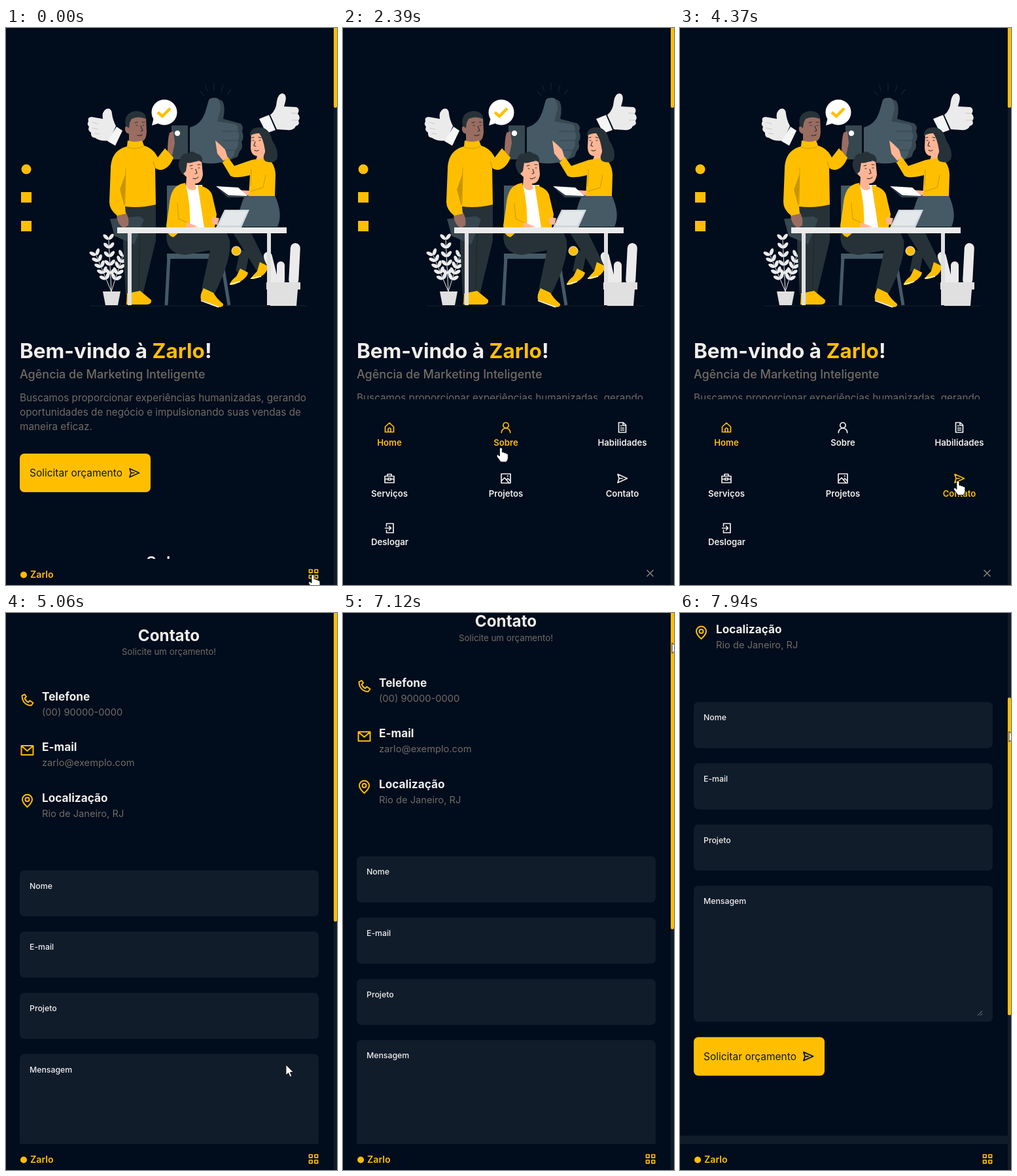
Animation of 506x852 px, one loop 8000 ms. Source, as an HTML page:

```html
<!DOCTYPE html>
<html lang="pt-BR">
<head>
<meta charset="utf-8">
<title>Agência de marketing</title>
<style>
  html, body { margin: 0; width: 100%; height: 100%; overflow: hidden; background: #010c1c; }
  svg { display: block; width: 100%; height: 100%; }
  text { font-family: Inter, "Open Sans", sans-serif; white-space: pre; }
  .y { fill: #ffbf00; }
  .dark { fill: #263238; }
  .slate { fill: #455a64; }
  .deep { fill: #37474f; }
  .pale { fill: #ebebeb; }
  .grey { fill: #e0e0e0; }
  .brown { fill: #9a6d61; }
  .skin { fill: #ffb594; }
  .fold { fill: none; stroke: #d49f00; stroke-width: 1.2; }
  .face { fill: none; stroke: #263238; stroke-width: 1.1; stroke-linecap: round; }
  .icon { fill: none; stroke: currentColor; stroke-width: 1.7; stroke-linecap: round; stroke-linejoin: round; }
  #contact .icon { stroke-width: 2; }
</style>
</head>
<body>
<svg viewBox="0 0 506 852" preserveAspectRatio="none">
  <defs>
    <path id="send" d="M-7-6.500 7.500 0-7 6.500-5 0zM-5 0H0"/>
    <path id="home-icon" d="M-6.500-1 0-7 6.500-1V7H-6.500zM-2 7V2Q0-.5 2 2V7"/>
    <path id="user" d="M0-7.500a4.200 4.200 0 1 1 0 8.400 4.200 4.200 0 1 1 0-8.400M-6.700 8C-6.700-1 6.700-1 6.700 8"/>
    <path id="doc" d="M-5.500-7.500H1.500L5.500-3.500V7.500H-5.500zM1-7V-3H5M-2.500-2.500H-1M-2.500 1H2.500M-2.500 4H2.500"/>
    <path id="case" d="M-7-3.500H7V6.500H-7zM-3-3.500V-6.500H3V-3.500M-7 1H-2M2 1H7M-2-.5H2V2.500H-2z"/>
    <path id="photo" d="M-7-7H7V7H-7zM-7 4-2-1 5 7M1 2 3 0 7 4M2.500-4h.5v.5h-.5z"/>
    <path id="exit" d="M-5-3V-7H5.500V7H-5V3M-7 0H2M-1-3 2 0-1 3"/>
    <path id="phone" d="M-4-8-8-6C-8 3-2 9 6 9L9 5 4 1.500 1.500 4C-1 3-3 0-4-2L-1.500-4.500z"/>
    <path id="mail" d="M-9-7H9V7H-9zM-8-6 0 1 8-6"/>
    <path id="pin" d="M0 9.500C-5 5-7.500 2-7.500-2a7.500 7.500 0 0 1 15 0C7.500 2 5 5 0 9.500zM0-5a3 3 0 1 1 0 6 3 3 0 1 1 0-6"/>
    <path id="grid" d="M-6.500-6.500h4.600v4.600h-4.600zM2-6.500h4.600v4.600H2zM-6.500 2h4.600v4.600h-4.600zM2 2h4.600v4.600H2z"/>
  </defs>
  <rect width="506" height="852" fill="#010c1c"/>

  <g id="home">
    <path d="M128 425H460" stroke="#17222c"/>
    <path d="M318 84V96M332 87 329 98M344 94 338 102M304 87 308 97M297 97 303 103" stroke="#12212c" stroke-width="1.3"/>

    <!-- floating thumbs -->
    <path class="pale" d="M126 143Q124 136 131 136L148 139Q146 128 153 124 161 121 162 131 163 140 168 150L158 172Q145 174 136 168 129 167 130 160 124 156 127 151 123 147 126 143z"/>
    <path fill="#f5f5f5" d="M169 151 178 157 167 180 155 173z"/>
    <path class="pale" d="M404 133Q413 126 414 112 416 100 423 100 430 102 427 113L425 120 444 121Q450 124 446 131 451 137 447 142 450 148 443 150 440 157 430 156L414 155z"/>
    <path fill="#f5f5f5" d="M387 139 402 133 412 156 398 161z"/>
    <path d="M132 144 141 147M132 153 141 155M135 161 143 162M436 130 446 131M437 141 447 141" stroke="#c9c9c9" fill="none"/>
    <path class="deep" d="M253 149H278V201H253z"/>
    <path class="deep" d="M322 107 331 112Q336 121 332 139L358 146Q364 150 361 158 365 168 360 174 363 184 357 189L354 197 330 207 310 150z"/>
    <path class="slate" d="M281 152C296 148 302 138 306 124L310 110Q313 106 322 107 328 112 328 124L323 143 350 147Q357 150 354 158 359 165 354 172 357 181 350 187 350 197 340 202 320 210 300 206L281 200z"/>
    <path d="M330 158H354M331 172H354M330 187H350" stroke="#37474f" fill="none"/>
    <circle cx="262" cy="161" r="4.200" fill="#fff"/>
    <path d="M226 137 223 149 236 145z" fill="#fff"/>
    <circle cx="242" cy="129" r="19.500" fill="#fff"/>
    <path d="M232 129 239 135 251 123" fill="none" stroke="#ffbf00" stroke-width="4.500"/>

    <!-- plants -->
    <g id="plant" class="pale" stroke="#ebebeb"></g>
    <path class="grey" d="M148 403H175L171 424H152z"/>
    <rect class="pale" x="432" y="329" width="15" height="64" rx="7.500" transform="rotate(3 439 390)"/>
    <rect class="pale" x="414" y="357" width="12" height="36" rx="6"/>
    <rect class="pale" x="404" y="341" width="13" height="52" rx="6.500" transform="rotate(-14 412 390)"/>
    <path class="grey" d="M398 389H450V400H446L444 425H404L401 400H398z"/>

    <!-- standing man -->
    <path class="dark" d="M181 270H229V325L209 408H183L179 330z"/>
    <path d="M206 290 204 345 203 400" fill="none" stroke="#1b262b"/>
    <path class="y" d="M185 406 205 402 222 416Q223 423 215 423H184z"/>
    <path class="deep" d="M159 292 204 288 211 293 196 331 166 318z"/>
    <path class="brown" d="M169 283 182 280Q189 290 187 302L180 306Q169 300 169 283z"/>
    <path class="brown" d="M247 190Q247 170 250 160L256 158 258 176 254 195z"/>
    <path class="brown" d="M186 139Q199 130 214 137L215 159Q214 173 207 173V180H188V162Q181 160 182 152 184 148 187 152z"/>
    <path class="dark" d="M183 150Q179 130 198 127 214 127 214 139 202 134 192 139L189 145 188 153z"/>
    <path class="y" d="M186 172Q198 176 208 172L211 180C222 183 228 190 232 198L243 184 256 198C251 213 238 222 228 214L229 270Q205 276 182 273L183 284 170 287Q158 278 158 266L160 215C161 196 168 186 185 181z"/>
    <path class="fold" d="M185 182Q198 187 210 181M183 214 182 270M228 214 225 204"/>
    <path fill="#c79600" d="M183 222 181 273 174 247z"/>
    <path class="face" d="M199 149h2M209 149h2M197 145l4-1M208 144h4M206 150l3 7-3 1M201 164q4 2 7-1"/>

    <!-- seated man -->
    <path class="slate" d="M246 241H268V315H246zM246 345H325V353H246z"/>
    <path d="M249 350 245 424M329 350 341 424" stroke="#455a64" stroke-width="5"/>
    <path class="dark" d="M346 312H374L399 363 385 374zM358 338 372 345 366 375 351 372z"/>
    <path class="dark" d="M246 312C242 336 256 347 275 347L312 340 299 400 318 408C330 385 345 350 342 325L336 310z"/>
    <circle class="y" cx="352" cy="341" r="7" stroke="#ebebeb"/>
    <path class="y" d="M302 398 317 405Q322 414 332 422 333 427 325 427L298 416Q296 408 302 398zM358 368 370 374Q369 381 358 388 346 395 342 392 344 386 352 380zM388 358 400 364Q400 374 390 380 377 386 374 383 378 378 384 372z"/>
    <path d="M298 417 325 427M342 392 358 388M374 383 390 380" stroke="#fff" stroke-width="1.500"/>
    <path fill="#fff" d="M275 240H300L304 305H274z"/>
    <path class="skin" d="M269 207 299 203 301 224Q299 238 289 238L291 246Q281 252 275 241L276 228 270 222z"/>
    <path class="dark" d="M270 224Q260 210 266 201 268 191 278 192 284 186 291 192 302 194 300 206L294 202Q281 208 277 206L275 219z"/>
    <path class="y" d="M274 237C255 240 251 253 249 275L245 302Q246 318 256 320L272 306 281 304Q283 270 274 237zM293 240Q311 244 315 255L322 285 319 305H303z"/>
    <path class="fold" d="M262 268 264 292 280 299"/>
    <path class="skin" d="M276 297 294 304 275 306zM315 289 326 291 323 301 315 300z"/>
    <path class="face" d="M283 215h2M294 214h2M281 211l4-1M293 209h4M290 216l2 6-3 1M286 230q5 2 8-2"/>

    <!-- seated woman -->
    <path class="slate" d="M366 254 411 256Q424 285 415 304H352Q355 278 366 254z"/>
    <path class="skin" d="M320 172 327 178 335 186 339 199 332 203 323 192z"/>
    <path class="dark" d="M373 163Q374 151 390 152 403 154 407 172 418 187 414 201 405 211 392 202L386 190z"/>
    <path class="skin" d="M375 161Q388 155 397 168L396 187 398 203 381 205 384 196Q374 195 374 182z"/>
    <path class="dark" d="M372 165Q376 151 390 154 401 161 400 190L396 187Q393 168 387 161 380 161 372 165z"/>
    <path class="y" d="M339 197 349 211 375 202 397 198Q411 205 412 224L411 257H371L373 225Q350 231 343 226L331 206z"/>
    <path class="dark" d="M397 176Q413 182 415 197 411 209 397 204 391 200 396 190z"/>
    <path class="fold" d="M375 216 374 242M397 225 393 244 374 250"/>
    <path class="skin" d="M373 249 358 248 351 253 371 256z"/>
    <path class="deep" d="M321 243 340 257H369V259H339z"/>
    <path fill="#fff" d="M321 242 355 244 369 257 340 256z"/>
    <path class="face" d="M377 172h2M387 172h2M376 168l3-1M386 167l4 1M381 174l-2 6 3 1M380 187q3 2 6 0"/>

    <path fill="#cfd8dc" d="M334 278H372L360 305H321z"/>
    <path fill="#e4e8ea" d="M336 280H369L358 302H325z"/>
    <path class="grey" d="M186 314h6V424h-6zM399 314h6V424h-6z"/>
    <path class="pale" d="M170 305H429V314H170z"/>

    <circle class="y" cx="31" cy="216" r="7.500"/>
    <rect class="y" x="23" y="251" width="16" height="16"/>
    <rect class="y" x="23" y="295" width="16" height="16"/>
  </g>

  <g id="contact"></g>

  <g id="bar">
    <rect y="812" width="501" height="40" fill="#010c1c"/>
    <circle class="y" cx="27" cy="836.500" r="5"/>
    <use href="#grid" class="icon" color="#ffbf00" transform="translate(470 835)"/>
  </g>
  <g id="menu">
    <rect y="568" width="501" height="284" fill="#010c1c"/>
    <path d="M464.500 829l10 10m0-10-10 10" stroke="#857e73" stroke-width="1.700"/>
  </g>

  <rect x="501" width="5" height="852" fill="#111c2b"/>
  <rect id="thumb" class="y" x="501" width="5" height="486" rx="2.500"/>

  <path id="arrow" d="M0 0V16L3.700 12.600 6.300 18.500 8.800 17.300 6.300 11.600H11.300z" fill="#fff" stroke="#111" stroke-width=".9"/>
  <path id="hand" d="M-3 1Q-1-1 1 1V7Q3 6 4 8 6 7 7 9 9 8 10 11V16Q10 19 7 22H-1L-7 14Q-8 10-5 11L-3 13z" fill="#fff" stroke="#111" stroke-width="1"/>
</svg>

<script>
const NS = 'http://www.w3.org/2000/svg', LOOP = 8000;
const YELLOW = '#ffbf00', WHITE = '#f0efec', MUTED = '#716c64', PANEL = '#111c2b', BRAND = 'Zarlo';
const $ = id => document.getElementById(id);

function add(parent, tag, attrs, content) {
  const el = document.createElementNS(NS, tag);
  for (const key in attrs) el.setAttribute(key, attrs[key]);
  if (content) el.textContent = content;
  parent.append(el);
  return el;
}
const label = (parent, x, y, size, weight, fill, str, anchor = 'start') =>
  add(parent, 'text', { x, y, 'font-size': size, 'font-weight': weight, fill, 'text-anchor': anchor }, str);
const icon = (parent, name, x, y, color) =>
  add(parent, 'use', { href: '#' + name, class: 'icon', color, transform: `translate(${x} ${y})` });

function button(parent, y) {
  add(parent, 'rect', { x: 21, y, width: 200, height: 59, rx: 7, fill: YELLOW });
  label(parent, 36, y + 35, 15.5, 400, '#101b28', 'Solicitar orçamento');
  icon(parent, 'send', 196, y + 29.5, '#101b28');
}

// Plant: leaves in pairs along each stem
for (const [tx, ty] of [[157, 324], [138, 348], [178, 350]]) {
  const dx = tx - 161, dy = ty - 403, lean = Math.atan2(dy, dx) * 180 / Math.PI;
  add($('plant'), 'path', { d: `M161 403L${tx} ${ty}`, 'stroke-width': 1 });
  for (let i = 2; i <= 6; i++) for (const side of [-1, 1])
    add($('plant'), 'ellipse', { cx: 6, rx: 5.5, ry: 2.7, stroke: 'none',
      transform: `translate(${161 + dx * i / 6} ${403 + dy * i / 6}) rotate(${lean + side * 42})` });
}

// Home page
const title = label($('home'), 21, 505, 31.5, 700, WHITE, 'Bem-vindo à ');
add(title, 'tspan', { fill: YELLOW }, BRAND);
add(title, 'tspan', {}, '!');
label($('home'), 21, 536, 18, 500, MUTED, 'Agência de Marketing Inteligente');
['Buscamos proporcionar experiências humanizadas, gerando',
 'oportunidades de negócio e impulsionando suas vendas de',
 'maneira eficaz.'].forEach((line, i) => label($('home'), 21, 570.5 + 22 * i, 15.3, 400, MUTED, line));
button($('home'), 651);
label($('home'), 249, 826, 24.5, 600, WHITE, 'Sobre', 'middle');

// Contact page
const contact = $('contact');
label(contact, 249, 42.5, 24.2, 650, WHITE, 'Contato', 'middle');
label(contact, 249, 64, 13.3, 400, MUTED, 'Solicite um orçamento!', 'middle');
[['phone', 'Telefone', '(00) 90000-0000'],
 ['mail', 'E-mail', 'zarlo@exemplo.com'],
 ['pin', 'Localização', 'Rio de Janeiro, RJ']].forEach(([name, head, text], i) => {
  const y = 134 + 77.4 * i;
  icon(contact, name, 32.5, y - 1.5, YELLOW);
  label(contact, 55, y, 17.2, 650, WHITE, head);
  label(contact, 55, y + 23, 14.7, 400, MUTED, text);
});
['Nome', 'E-mail', 'Projeto', 'Mensagem'].forEach((name, i) => {
  const y = 393.5 + 93.7 * i;
  add(contact, 'rect', { x: 21, y, width: 457, height: i < 3 ? 70.5 : 208, rx: 7, fill: PANEL });
  label(contact, 36, y + 28, 12.3, 500, WHITE, name);
});
add(contact, 'path', { d: 'M455 873l7-7m-3 7l3-3', stroke: '#8b9098' });
button(contact, 906);
add(contact, 'rect', { y: 1057, width: 501, height: 200, fill: PANEL });

// Bottom bar and menu
label($('bar'), 37, 841, 14.2, 600, YELLOW, BRAND);
const items = [
  ['home-icon', 'Home', 71, 611], ['user', 'Sobre', 249, 611], ['doc', 'Habilidades', 427, 611],
  ['case', 'Serviços', 71, 689], ['photo', 'Projetos', 249, 689], ['send', 'Contato', 427, 689],
  ['exit', 'Deslogar', 71.5, 765]
].map(([name, text, x, y], i) => {
  const g = add($('menu'), 'g', { fill: 'currentColor' });
  icon(g, name, x, y, 'currentColor');
  label(g, x, y + (i < 6 ? 28 : 26), 13.2, 600, 'currentColor', text, 'middle');
  return { g, x, y, active: i === 0 };
});

// Tables of [time, values...]
const cursorPath = [
  [0, 470, 836], [820, 470, 836], [1100, 330, 812], [1300, 207, 787], [1640, 207, 787],
  [2000, 249, 705], [2350, 246, 640], [2700, 150, 690], [3050, 70, 699], [3480, 70, 699],
  [3850, 249, 704], [4250, 424, 694], [4500, 428, 691], [5250, 428, 691],
  [5740, 472, 430], [6150, 498, 190], [6480, 503, 22], [6700, 503, 32], [6800, 503, 32],
  [7050, 503, 40], [7250, 503, 56], [7460, 503, 84], [7700, 503, 132], [7940, 503, 181], [8000, 503, 192]
];
const scrollPath = [[6800, 0], [7050, 12], [7250, 38], [7460, 84], [7700, 170], [7940, 257], [8000, 276]];
const menuPath = [[280, 284], [600, 0], [4640, 0], [4920, 284]];
const PAGE_CHANGE = 4990;

const linear = u => u, smooth = u => u * u * (3 - 2 * u);
function sample(table, t, ease = linear) {
  const next = table.findIndex(row => row[0] > t);
  if (next === 0) return table[0].slice(1);
  if (next < 0) return table[table.length - 1].slice(1);
  const a = table[next - 1], b = table[next], u = ease((t - a[0]) / (b[0] - a[0]));
  return a.slice(1).map((v, i) => v + (b[i + 1] - v) * u);
}
const show = (el, on) => el.setAttribute('visibility', on ? 'visible' : 'hidden');
const move = (el, x, y) => el.setAttribute('transform', `translate(${x} ${y})`);

function draw(t) {
  const [x, y] = sample(cursorPath, t, t < 6800 ? smooth : linear);
  const [scroll] = sample(scrollPath, t);
  const [drop] = sample(menuPath, t, smooth);
  const onContact = t >= PAGE_CHANGE;

  show($('home'), !onContact);
  show(contact, onContact);
  move(contact, 0, -scroll);
  move($('menu'), 0, drop);
  $('thumb').setAttribute('y', onContact ? -14 + scroll * .557 : 122 - 486);

  let pointing = !onContact && x > 458 && y > 822;
  for (const item of items) {
    const over = drop < 1 && Math.abs(x - item.x) < 38 && y > item.y - 12 && y < item.y + 34;
    item.g.setAttribute('color', over || item.active ? YELLOW : WHITE);
    pointing = pointing || over;
  }
  show($('hand'), pointing);
  show($('arrow'), !pointing);
  move($('hand'), x, y);
  move($('arrow'), x, y);
}

const start = performance.now();
function tick() {
  draw((performance.now() - start) % LOOP);
  requestAnimationFrame(tick);
}
tick();
</script>
</body>
</html>
```
